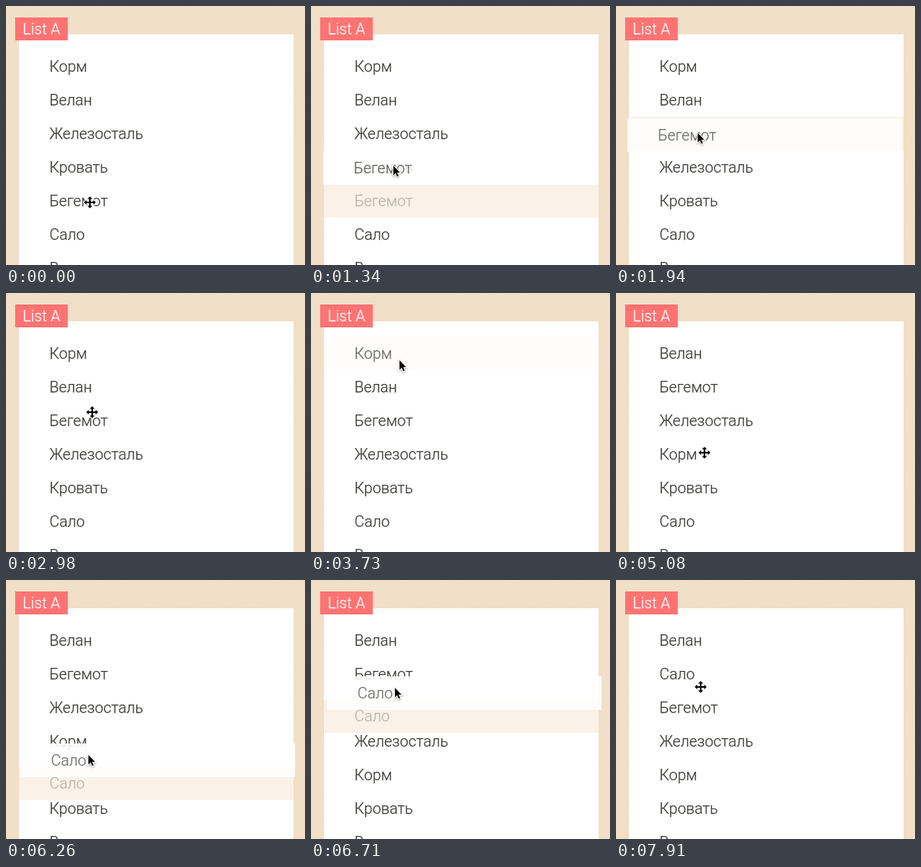
Animation of 392x339 px, one loop 8000 ms. Source, as an HTML page:

```html
<!DOCTYPE html>
<html lang="ru">
<head>
<meta charset="utf-8">
<title>Sortable list</title>
<style>
  html, body { margin: 0; width: 100%; height: 100%; overflow: hidden; }
  body {
    position: relative;
    background: repeating-linear-gradient(135deg, #f2e0c8 0 2px, #f0dec6 2px 4px);
    font: 300 20px Roboto, sans-serif;
    color: #3c3c38;
    -webkit-text-stroke: .25px;
  }
  body > * { position: absolute; left: 0; top: 0; }
  #card { left: 17px; top: 37px; width: 360px; height: 310px; background: #fff; }
  #label {
    left: 12px; top: 15px; padding: 0 10px;
    line-height: 30px; color: #fff; background: #ff7373;
  }
  .row { width: 320px; height: 44px; padding-left: 40px; line-height: 44px; white-space: nowrap; }
  .held { z-index: 1; background: #faf2e7; color: #b9b4ab; }
  #ghost { z-index: 2; background: #fff; color: #5c5c56; opacity: .88; }
  svg { z-index: 3; overflow: visible; width: 1px; height: 1px; }
  path { stroke: #fff; stroke-width: 2; paint-order: stroke; }
  #move path { transform: scale(1.12); }
  #arrow { filter: drop-shadow(0 1px 1px rgba(0, 0, 0, .35)); }
</style>
</head>
<body>
<div id="card"></div>
<div id="label">List A</div>
<div id="ghost" class="row"></div>
<svg id="move"><path d="M0-7l3 3H1V-1H4V-3L7 0 4 3V1H1V4H3L0 7-3 4H-1V1H-4V3L-7 0-4-3V-1H-1V-4H-3Z"/></svg>
<svg id="arrow"><path d="M1 1V13.5l2.9-2.8 2 4.6 2-.9-2-4.5H9.7z"/></svg>
<script>
const LOOP = 8000, TICK = 148.8, LEFT = 17, TOP = 57, ROW = 44;
const words = ['Корм', 'Велан', 'Железосталь', 'Кровать', 'Бегемот', 'Сало', 'Ворон'];

// Pointer moves: first tick, last tick, x, y at the end
const moves = [
  [0, 0, 110, 257], [3, 4, 108, 251], [6, 12, 106, 165], [17, 20, 113, 156], [20, 23, 115, 87],
  [25, 30, 112, 216], [31, 34, 116, 209], [34, 39, 105, 291], [39, 46, 109, 131], [51, 53, 111, 140]
];
// Ticks of pick-up and drop
const drags = [[4, 18], [24, 32], [39, 52]];

const byId = id => document.getElementById(id);
const ghost = byId('ghost'), move = byId('move'), arrow = byId('arrow');
const rows = {};
for (const word of words) {
  const row = rows[word] = document.createElement('div');
  row.className = 'row';
  row.textContent = word;
  document.body.append(row);
}

const place = (el, x, y) => { el.style.transform = `translate(${x}px, ${y}px)`; };
const show = (el, on) => { el.style.display = on ? '' : 'none'; };
const mix = (a, b, k) => a + (b - a) * k;

function pointerAt(n) {
  let x = 0, y = 0;
  for (const [from, to, endX, endY] of moves) {
    if (n < from) break;
    const k = Math.min(1, (n - from) / (to - from || 1));
    const ease = to > from ? k * k * (3 - 2 * k) : 1;
    x = mix(x, endX, ease);
    y = mix(y, endY, ease);
  }
  return [x, y];
}

const rowAt = n => Math.floor((pointerAt(n)[1] - TOP) / ROW);

// The held row trails the pointer and slides the last quarter into place
function slotAt(n, start) {
  const trail = lag => rowAt(Math.max(start, n - lag));
  return mix(trail(1.5), trail(1.9), .25);
}

function draw(t) {
  const n = Math.floor(t / TICK);
  const [x, y] = pointerAt(n).map(Math.round);
  const order = [...words];
  let held = null, slot;

  for (const [start, end] of drags) {
    if (n < start) break;
    const home = rowAt(start);
    const [word] = order.splice(home, 1);
    slot = slotAt(Math.min(n, end), start);
    order.splice(Math.round(slot), 0, word);
    held = n < end ? word : null;
    if (held) {
      const [startX, startY] = pointerAt(start);
      ghost.textContent = word;
      place(ghost, LEFT + x - startX, TOP + ROW * home + y - startY);
    }
  }

  order.forEach((word, i) => {
    rows[word].classList.toggle('held', word === held);
    place(rows[word], LEFT, TOP + ROW * (word === held ? slot : i));
  });

  show(ghost, held);
  show(arrow, held);
  show(move, !held);
  place(held ? arrow : move, x, y);
}

const began = performance.now();
function frame() {
  draw((performance.now() - began) % LOOP);
  requestAnimationFrame(frame);
}
frame();
</script>
</body>
</html>
```
